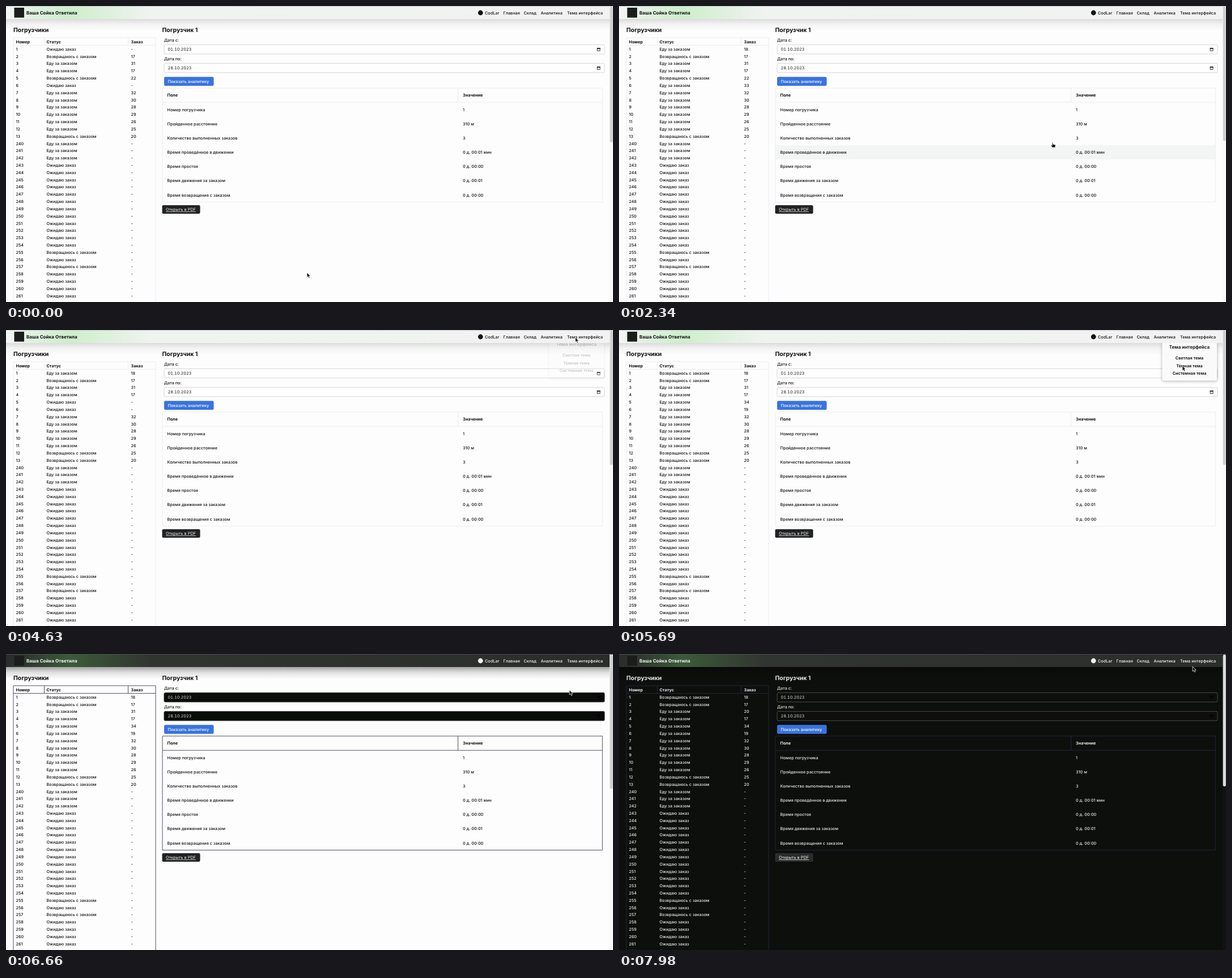
Animation, 1071 px wide and 523 px high, one loop 8 s. Source, as an HTML page:

```html
<!DOCTYPE html>
<html lang="ru">
<head>
<meta charset="utf-8">
<title>Погрузчики</title>
<style>
html, body { margin: 0; width: 100%; height: 100%; overflow: hidden; }
svg { display: block; width: 1071px; height: 523px; }
text { font: 500 7.25px Inter, sans-serif; text-rendering: geometricPrecision; white-space: pre; }
.bold { font-weight: 700; }
.title { font-weight: 700; font-size: 10.46px; }
.brand { font-weight: 700; font-size: 8.1px; }
.menu { font-weight: 600; font-size: 8.1px; text-anchor: middle; }
.item { font-weight: 600; text-anchor: middle; }
.link { text-decoration: underline; font-weight: 400; font-size: 7.32px; }
.date { font-weight: 400; font-size: 7.32px; font-variant-numeric: tabular-nums; }
</style>
</head>
<body>
<svg id="stage" viewBox="0 0 1071 523"></svg>
<script>
const LOOP = 8000;
const stage = document.getElementById('stage');

// The screen refreshes only at these moments (ms).
const steps = [0, 150, 221, 293, 364, 436, 507, 579, 650, 860, 1220, 1570, 1880, 1990, 2340, 2440,
  2710, 2920, 3130, 3340, 3550, 3750, 3900, 4010, 4120, 4420, 4630, 4860, 5010, 5160, 5320,
  5530, 5690, 6060, 6230, 6410, 6660, 6940, 7130, 7320, 7720, 7900, 7980];

// Keys are [time, ...values].
const cursorKeys = [[0, 531, 471], [120, 531, 471], [650, 700, 291], [860, 718, 276], [1990, 748, 259],
  [2340, 765, 241], [2440, 770, 236], [3750, 998, 15], [4630, 1004.5, 13], [4860, 1004, 15],
  [5690, 994, 63.5], [7720, 994, 63.5], [7980, 1012, 22]];
const menuKeys = [[4420, 0], [4630, .2], [4860, .75], [5010, 1], [6060, 1], [6410, .45], [6660, 0]];
const nightKeys = [[7600, 0], [7720, .234], [7900, .75], [7980, 1]];

const WAIT = 'Ожидаю заказ', RIDE = 'Еду за заказом', BACK = 'Возвращаюсь с заказом';
const forklifts = [[1, WAIT, '-'], [2, BACK, 17], [3, RIDE, 31], [4, RIDE, 17], [5, BACK, 22], [6, WAIT, '-'],
  [7, RIDE, 32], [8, RIDE, 30], [9, RIDE, 28], [10, RIDE, 29], [11, RIDE, 26], [12, RIDE, 25], [13, BACK, 20]];
for (let n = 240; n <= 262; n++)
  forklifts.push([n, n < 243 ? RIDE : n === 255 || n === 257 ? BACK : WAIT, '-']);

// [time, forklift, status, order]
const updates = [[1570, 1, RIDE, 18], [1570, 6, RIDE, 33], [3750, 5, WAIT, '-'], [3750, 6, WAIT, '-'],
  [3750, 12, BACK, 25], [5530, 5, RIDE, 34], [5690, 6, RIDE, 19], [5690, 1, BACK, 18], [7900, 3, RIDE, 20]];

const report = [['Номер погрузчика', '1'], ['Пройденное расстояние', '310 м'],
  ['Количество выполненных заказов', '3'], ['Время проведённое в движении', '0 д. 00:01 мин'],
  ['Время простоя', '0 д. 00:00'], ['Время движения за заказом', '0 д. 00:01'],
  ['Время возвращения с заказом', '0 д. 00:00']];
const nav = [[845, 'CodLar'], [877.5, 'Главная'], [913.5, 'Склад'], [943.5, 'Аналитика'], [990, 'Тема интерфейса']];

function valueAt(keys, t) {
  const next = keys.findIndex(k => k[0] > t);
  if (next === 0) return keys[0].slice(1);
  if (next < 0) return keys[keys.length - 1].slice(1);
  const a = keys[next - 1], b = keys[next], p = (t - a[0]) / (b[0] - a[0]);
  return a.slice(1).map((v, i) => v + (b[i + 1] - v) * p);
}
const mix = (a, b, p) => `rgb(${a.map((v, i) => Math.round(v + (b[i] - v) * p))})`;
const gray = v => [v, v, v];

const rect = (x, y, w, h, fill, extra = '') =>
  `<rect x="${x}" y="${y}" width="${w}" height="${h}" fill="${fill}" ${extra}/>`;
// y is the middle of the capital letters
const text = (x, y, str, fill, cls = '') =>
  `<text x="${x}" y="${y + (/title/.test(cls) ? 3.8 : 2.65)}" fill="${fill}" class="${cls}">${str}</text>`;
const lines = (d, color) => `<path d="${d}" fill="none" stroke="${color}" stroke-width=".9"/>`;
const gradient = (id, dir, stops) => `<linearGradient id="${id}" ${dir}>` +
  stops.map(([o, c, a = 1]) => `<stop offset="${o}" stop-color="${c}" stop-opacity="${a}"/>`).join('') +
  '</linearGradient>';

function forkliftTable(t, ink, border) {
  const rows = forklifts.map(r => r.slice());
  for (const [time, n, status, order] of updates)
    if (t >= time) rows[n - 1] = [n, status, order];
  const columns = [17.5, 71.5, 220.5];
  const cells = (row, y, cls) => row.map((c, i) => text(columns[i], y, c, ink, cls)).join('');
  return lines('M13 530V56H264V530M13 69.5H264M67.5 56V69.5M215.5 56V69.5', border) +
    cells(['Номер', 'Статус', 'Заказ'], 63, 'bold') +
    rows.map((r, i) => cells(r, 76.2 + 12.82 * i)).join('');
}

function reportTable(hovered, ink, border) {
  return (hovered >= 0 ? rect(276, 170.7 + 25.1 * hovered, 776, 25.1, '#f3f4f4') : '') +
    lines('M276 145H1052.3V346.5H276ZM276 170.2H1052.3M797.5 145V170.2', border) +
    text(284.5, 157.7, 'Поле', ink, 'bold') + text(806, 157.7, 'Значение', ink, 'bold') +
    report.map(([name, value], i) =>
      text(284.5, 183.3 + 25.1 * i, name, ink) + text(806, 183.3 + 25.1 * i, value, ink)).join('');
}

function dateField(label, value, y, ink, dark, night) {
  const fill = dark ? mix([10, 12, 10], [14, 15, 13], night) : '#fefefe';
  const edge = dark ? mix(gray(32), [82, 82, 84], night) : '#d2d3d8';
  const icon = dark ? '#000' : '#111';
  return text(279, y - 16.6, label, ink) +
    rect(279, y - 8.2, 777, 16.4, fill, `rx="2" stroke="${edge}" stroke-width=".9"`) +
    text(285.5, y + .2, value, dark ? '#d4d4d4' : '#222', 'date') +
    rect(1043.2, y - 2.2, 4.8, 4.8, 'none', `stroke="${icon}" stroke-width=".8"`) +
    rect(1042.8, y - 2.6, 5.6, 1.7, icon);
}

function themeMenu(opacity, dark) {
  if (!opacity) return '';
  const shift = (opacity - .2) * 6;
  return `<g opacity="${opacity}" transform="translate(0 ${shift})">` +
    rect(958.5, 17, 96.5, 67.5, dark ? '#151515' : '#fafafa', 'rx="3" filter="url(#soft)"') +
    text(1006.5, 25.5, 'Тема интерфейса', '#0a0a0a', 'menu') +
    ['Светлая тема', 'Тёмная тема', 'Системная тема'].map((s, i) =>
      text(1006.5, 44.7 + 13.4 * i, s, '#0a0a0a', 'item')).join('') + '</g>';
}

function header(dark) {
  const ink = dark ? '#f2f2f2' : '#111';
  return rect(0, 0, 1065, 23, 'url(#bar)') + rect(0, 0, 1071, 1, dark ? '#4a4d50' : '#c3c8d0') +
    rect(14.5, 3, 17.5, 17.5, '#1b1d1c') +
    text(36, 12.2, 'Ваша Сойка Ответила', ink, 'brand') +
    `<circle cx="837.2" cy="12" r="4.4" fill="${ink}"/>` +
    nav.map(([x, s]) => text(x, 12.2, s, ink)).join('');
}

function pointer(x, y, hand) {
  const shape = hand
    ? 'M-.8 .3Q0-.6 .8 .3V3.2L4.3 4Q5.4 4.4 5.2 5.6L4.6 9H-.3L-3 5.6Q-3 4.4-1.9 4.7L-.8 5.6Z'
    : 'M0 0V8.6L2 6.8L3.5 10L5 9.3L3.6 6.2H6.2Z';
  return `<path transform="translate(${x} ${y})" d="${shape}" fill="#111" stroke="#fff" stroke-width=".7"/>`;
}

const rowUnder = ([x, y]) => x > 276 && x < 1052 && y > 170.7 && y < 346.4 ? Math.floor((y - 170.7) / 25.1) : -1;

function draw(step) {
  const t = steps[step];
  const dark = t >= 6230;
  const [night] = valueAt(nightKeys, t);
  const [menu] = valueAt(menuKeys, t);
  const cursor = valueAt(cursorKeys, t);
  // The row highlight trails the pointer by one refresh.
  const hovered = step ? rowUnder(valueAt(cursorKeys, steps[step - 1])) : -1;
  const page = mix(gray(253), [13, 15, 13], night);
  const ink = mix(gray(17), gray(232), night);
  const border = dark ? mix([62, 62, 90], [40, 40, 62], night) : '#ebebf3';
  const barStops = dark
    ? [[0, '#2a2c2a'], [.04, '#2f3a2f'], [.105, '#3b5b38'], [.24, '#313531'], [1, '#2b2d2b']]
    : [[0, '#f5f6f5'], [.04, '#e2f1e2'], [.105, '#cdeecb'], [.24, '#f0f3f0'], [1, '#f1f2f1']];
  const thumbHeight = t >= 7900 ? 233 : t >= 1570 ? 237.5 : 240;

  stage.innerHTML = '<defs>' + gradient('bar', '', barStops) +
    gradient('shade', 'x2="0" y2="1"', [[0, '#000', dark ? .36 : .13], [.45, '#000', dark ? .12 : .04], [1, '#000', 0]]) +
    '<filter id="soft" x="-20%" y="-20%" width="140%" height="140%">' +
    '<feDropShadow dx="0" dy="1" stdDeviation="2.5" flood-opacity=".35"/></filter></defs>' +
    rect(0, 0, 1071, 523, page) +
    text(13, 41.8, 'Погрузчики', ink, 'title') + forkliftTable(t, ink, border) +
    text(275.5, 41.8, 'Погрузчик 1', ink, 'title') +
    dateField('Дата с:', '01.10.2023', 76.6, ink, dark, night) +
    dateField('Дата по:', '28.10.2023', 109.6, ink, dark, night) +
    rect(279, 125.3, 87.5, 15.7, '#3973e0', 'rx="2.2"') + text(285.5, 133.3, 'Показать аналитику', '#fff') +
    reportTable(hovered, ink, border) +
    rect(275.5, 352, 67, 15, mix([33, 34, 35], [43, 44, 43], night), 'rx="2.2"') +
    text(282, 359.6, 'Открыть в PDF', '#f0f0f0', 'link') +
    rect(0, 23, 1065, 21, 'url(#shade)') +
    themeMenu(menu, dark) + header(dark) +
    rect(1065, 1, 6, 522, mix(gray(249), gray(18), night)) +
    rect(1065.6, 1, 5.2, thumbHeight, mix(gray(207), gray(222), night), 'rx="2.4"') +
    pointer(...cursor, rowUnder(cursor) >= 0);
}

let shown = -1;
function tick() {
  const t = performance.now() % LOOP;
  const step = steps.findLastIndex(s => s <= t);
  if (step !== shown) draw(shown = step);
  requestAnimationFrame(tick);
}
tick();
</script>
</body>
</html>
```
